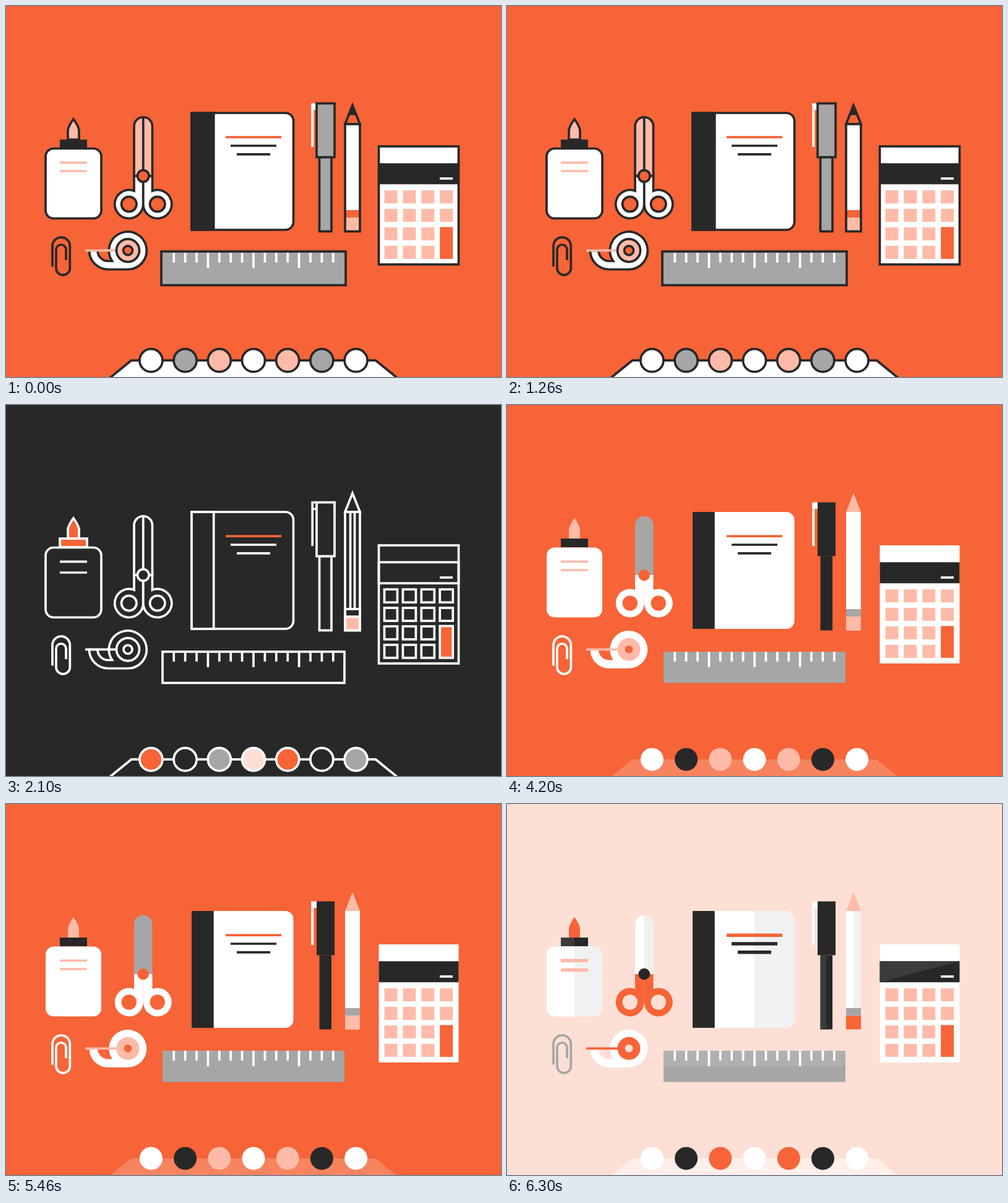
Write an HTML page that moves like this. It is 800 px wide and 600 px high and loops after 8.4 s.

```html
<!DOCTYPE html>
<html lang="en">
<head>
<meta charset="utf-8">
<title>Desk supplies</title>
<style>
html, body { margin: 0; width: 100%; height: 100%; overflow: hidden; }
svg { display: block; width: 100%; height: 100%; }
</style>
</head>
<body>
<svg id="stage" viewBox="0 0 800 600"></svg>
<script>
const O = '#f66437', D = '#282828', P = '#ffbaa8', G = '#a6a6a6', W = '#fff', L = '#fddfd5', N = 'none';
const SHADE = '#f1f1f1', SOFT = '#3c3c3c';
const STEP = 2100, LINE = 3.7;

// line: outer contours, inner: contours of small parts
const flat = {
  bg: O, line: N, inner: N, body: W, spine: D, nozzle: P, cap: D, label: P, labelY: 267, bar: LINE, text: D,
  blade: G, handle: W, pivot: O, pen: D, clip: W, tip: P, pencilTop: 173, band: G, eraser: P,
  key: P, clipWire: W, tape: W, strip: P, roll: P, hole: 6.3, ruler: G, tray: '#f8835f', dots: [W, D, P, W]
};
const themes = [
  { ...flat, line: D, blade: P, pen: G, tip: O, pencilTop: 191, band: O, clipWire: D, hole: 7.5, grow: 2,
    tray: W, dots: [W, G, P, W, P, G, W] },
  { ...flat, bg: D, line: W, inner: W, body: D, nozzle: O, cap: O, label: W, labelY: 271, text: W,
    blade: D, handle: D, pivot: D, clip: N, tip: D, band: D, key: D, tape: D, strip: W, roll: D, hole: 7,
    ruler: D, tray: D, dots: [O, D, G, L, O, D, G] },
  { ...flat, dots: [W, D, P, W, P, D, W] },
  { ...flat, bg: L, shaded: true, nozzle: O, labelY: 268.5, bar: 5.5, blade: W, handle: O, pivot: D,
    eraser: O, clipWire: G, strip: O, roll: O, tray: '#feefea', dots: [W, D, O, W, O, D, W] }
];

const path = (d, fill, stroke = N, width = LINE) =>
  `<path d="${d}" fill="${fill}" stroke="${stroke}" stroke-width="${width}"/>`;
const rect = (x, y, w, h, fill, stroke = N, r = 0) =>
  `<rect x="${x}" y="${y}" width="${w}" height="${h}" rx="${r}" fill="${fill}" stroke="${stroke}" stroke-width="${LINE}"/>`;
const circle = (x, y, r, fill, stroke = N) =>
  `<circle cx="${x}" cy="${y}" r="${r}" fill="${fill}" stroke="${stroke}" stroke-width="${LINE}"/>`;
const bar = (x1, x2, y, color, width = LINE) => path(`M${x1} ${y}H${x2}`, N, color, width);
const range = n => [...Array(n).keys()];

const glue = t =>
  path('M100 216V201Q101 194 109 183Q117 194 118 201V216Z', t.nozzle, t.line) +
  rect(87, 216, 44, 14, t.cap, t.inner) +
  (t.shaded ? rect(87, 216, 22, 14, SOFT) : '') +
  rect(64, 230.5, 90, 113, t.body, t.line, 13) +
  (t.shaded ? path('M109 230.5H141A13 13 0 0 1 154 243.5V330.5A13 13 0 0 1 141 343.5H109Z', SHADE) : '') +
  bar(87, 131, 253.3, t.label, t.bar) + bar(87, 131, t.labelY, t.label, t.bar);

const scissors = t =>
  path('M207 275V194.5A14.75 14.75 0 0 1 236.5 194.5V275Z', t.blade, t.line) +
  (t.shaded ? path('M221.75 179.75A14.75 14.75 0 0 1 236.5 194.5V275H221.75Z', SHADE) : '') +
  path('M207 275H221.75V320.5A23 23 0 1 1 207 299Z', t.handle, t.line) +
  path('M236.5 275H221.75V320.5A23 23 0 1 0 236.5 299Z', t.handle, t.line) +
  path('M221.75 180V275', N, t.line) +
  circle(198.75, 320.5, 12.2, t.bg, t.line) + circle(244.75, 320.5, 12.2, t.bg, t.line) +
  circle(221.75, 275, 9.3, t.pivot, t.line);

const notebook = t =>
  path('M300 173H451.5A13 13 0 0 1 464.5 186V349A13 13 0 0 1 451.5 362H300Z', t.body, t.line) +
  (t.shaded ? path('M400 173H451.5A13 13 0 0 1 464.5 186V349A13 13 0 0 1 451.5 362H400Z', SHADE) : '') +
  rect(300, 173, 35.7, 189, t.spine, t.line) +
  bar(355, 445, 212.2, O, t.bar) + bar(363, 437, 226, t.text, t.bar) + bar(373, 427, 239.8, t.text, t.bar);

const pen = t =>
  path('M493.3 157.5H502V168H497.2V228H493.3Z', t.clip) +
  path('M502 157.5H495.2V228M495.2 168H502', N, t.inner) +
  rect(506.5, 244.5, 19.5, 120, t.pen, t.line) +
  (t.shaded ? rect(506.5, 244.5, 9.75, 120, SOFT) : '') +
  rect(502, 157.5, 29, 87, t.pen, t.line);

const pencil = t => {
  const y = t.pencilTop, apex = y - 30.5;
  return path(`M548 ${y}L560 ${apex}L572 ${y}Z`, t.tip, t.line) +
    (t.grow ? path(`M560 ${apex}L566.5 176.5H553.5Z`, D) : '') +
    rect(548, y, 24, 364.5 - y, t.body) +
    (t.shaded ? rect(560, y, 12, 364.5 - y, SHADE) : '') +
    path(`M556.5 ${y}V330M563.5 ${y}V330`, N, t.inner) +
    rect(548, 330, 24, 12.5, t.band, t.inner) +
    rect(548, 342.5, 24, 22, t.eraser, t.inner) +
    rect(548, y, 24, 364.5 - y, N, t.line);
};

const calculator = t =>
  rect(602.5, 227, 129, 191, t.body) +
  rect(602.5, 254.3, 129, 34, D, t.inner) +
  (t.shaded ? path('M602.5 288.3V254.3H731.5Z', SOFT) : '') +
  rect(602.5, 227, 129, 191, N, t.line) +
  bar(701, 722, 279, W) +
  range(14).map(i => rect(611.5 + 29.9 * (i % 4), 298.2 + 29.9 * (i >> 2), 21, 21, t.key, t.inner)).slice(0, 11).join('') +
  range(3).map(i => rect(611.5 + 29.9 * i, 387.9, 21, 21, t.key, t.inner)).join('') +
  rect(701.2, 357.5, 21, 51.4, O, t.inner);

const paperclip = t =>
  path('M75 421.5V387.2A14.2 14.2 0 0 1 103.3 387.2V425A11.2 11.2 0 0 1 81 425V394A8 8 0 0 1 97 394V411', N, t.clipWire);

const tape = t =>
  path('M134.5 395.5A30.5 30.5 0 0 0 165 426H197A30.5 30.5 0 1 0 171.5 412.5H165A17 17 0 0 1 148 395.5Z', t.tape, t.line) +
  bar(128, 180, 395.3, t.strip) +
  circle(197, 395.3, 18.5, t.roll, t.line) +
  circle(197, 395.3, t.hole, t.bg, t.line);

const ruler = t => {
  const g = t.grow || 0;
  return rect(253 - g, 399 - g, 294 + 2 * g, 50.5 + 2 * g, t.ruler, t.line) +
    (t.shaded ? rect(253, 399, 294, 25.2, '#b0b0b0') : '') +
    range(15).map(i => path(`M${271.2 + 18.4 * i} 399V${i % 4 == 3 ? 424 : 415}`, N, W)).join('');
};

const tray = t =>
  path('M157.3 610L202.5 573.2H597.5L642.7 610Z', t.tray, t.line) +
  t.dots.map((c, i) => circle(234.4 + 55.2 * i, 573.2, 18.5, c, t.line)).join('');

const parts = [glue, scissors, notebook, pen, pencil, calculator, paperclip, tape, ruler, tray];
const scenes = themes.map(t => rect(0, 0, 800, 600, t.bg) + parts.map(draw => draw(t)).join(''));

const stage = document.getElementById('stage');
let shown = -1;
function tick() {
  const i = Math.floor(performance.now() / STEP) % scenes.length;
  if (i !== shown) stage.innerHTML = scenes[shown = i];
  requestAnimationFrame(tick);
}
tick();
</script>
</body>
</html>
```
